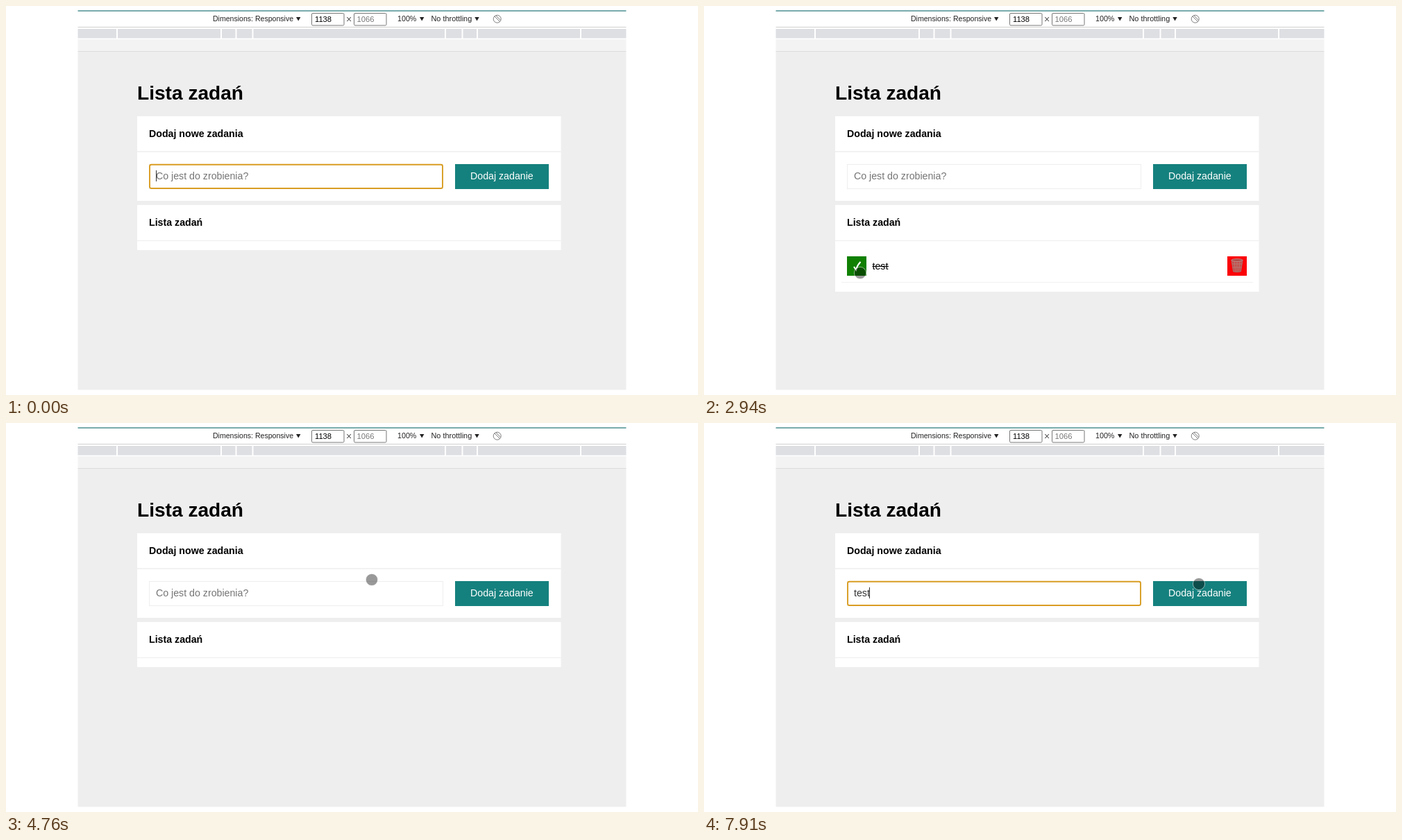
Recreate the animation shown at these times as an HTML page. Size 997x561 px, loop 8000 ms.

```html
<!DOCTYPE html>
<html lang="pl">
<head>
<meta charset="utf-8">
<title>Lista zadań</title>
<style>
  html, body { margin: 0; width: 100%; height: 100%; overflow: hidden; background: #fff; }
  svg { display: block; width: 997px; height: 561px; font: 14.2px "Liberation Sans", Arial, sans-serif; }
  .bold { font-weight: bold; }
  .tools { font-size: 10.7px; fill: #222; }
</style>
</head>
<body>
<svg viewBox="0 0 997 561">
  <!-- browser toolbar and ruler -->
  <path d="M103.5 7H893.5" stroke="#4a918f" stroke-width="1.4"/>
  <path d="M103.5 30.5H893.5" stroke="#cfcfcf"/>
  <g class="tools">
    <text x="298" y="22" font-size="10.55">Dimensions: Responsive</text>
    <text x="564" y="22">100%</text>
    <text x="612.5" y="22" font-size="10.9">No throttling</text>
    <text x="490" y="24" font-size="14" fill="#555">×</text>
    <path d="M418 16h6.4l-3.2 5.4zM596 16h6.4l-3.2 5.4zM675.300 16h6.400l-3.200 5.400z"/>
    <g fill="#fff" stroke="#767676">
      <rect x="440.500" y="10.500" width="46.500" height="17.500" rx="1.500"/>
      <rect x="501.500" y="10.500" width="46.500" height="17.500" rx="1.500"/>
    </g>
    <text x="445" y="23" font-size="11.2" fill="#000">1138</text>
    <text x="505.500" y="23" font-size="11.2" fill="#777">1066</text>
    <g fill="none" stroke="#7b7b7b">
      <circle cx="707.700" cy="18.700" r="5.500"/>
      <path d="M703.800 14.800l7.800 7.800M705.800 13.800l6.600 6.600"/>
    </g>
  </g>
  <rect x="103.500" y="33" width="790" height="13.500" fill="#dedfe3"/>
  <path d="M160 32v15M310 32v15M331.500 32v15M355.500 32v15M633 32v15M657.500 32v15M679 32v15M828 32v15" stroke="#fff" stroke-width="2"/>
  <rect x="103.500" y="48" width="790" height="17" fill="#f3f3f3"/>
  <rect x="103.500" y="65" width="790" height="488.500" fill="#eee"/>
  <path d="M103.500 65.500H893.500" stroke="#dcdcdc"/>

  <!-- form -->
  <text class="bold" x="189" y="135" font-size="28.1">Lista zadań</text>
  <rect x="189" y="159" width="610.500" height="122" fill="#fff"/>
  <path d="M189 210H799.500" stroke="#eee" stroke-width="1.300"/>
  <text class="bold" x="206" y="189">Dodaj nowe zadania</text>
  <rect x="206.500" y="228.500" width="423" height="35" fill="#fff" stroke="#eee"/>
  <rect id="ring" x="207" y="228.700" width="422" height="34.300" rx="2.500" fill="#fff" stroke="#d99d22" stroke-width="1.900"/>
  <text id="field" x="216" y="250"></text>
  <path id="caret" d="M0 237v16" stroke="#333"/>
  <rect x="647" y="228" width="135" height="36" fill="#15817e"/>
  <text x="669" y="250" fill="#fff">Dodaj zadanie</text>

  <!-- task list -->
  <rect id="panel" x="189" y="287" width="610.500" height="65" fill="#fff"/>
  <path d="M189 338.500H799.500" stroke="#eee"/>
  <text class="bold" x="206" y="317">Lista zadań</text>
  <g id="task">
    <path d="M198 398.500H791" stroke="#f1f1f1"/>
    <rect x="206" y="361" width="28" height="28" fill="#108002"/>
    <text x="242.500" y="380">test</text>
    <g id="done" fill="none">
      <path d="M216 376l3 4.500q2-7 6.500-11.500" stroke="#fff" stroke-width="2.100"/>
      <path d="M242.500 375.500h23.500" stroke="#000" stroke-width="1.200"/>
    </g>
    <rect x="754" y="361" width="28" height="28" fill="#fb0207"/>
    <path d="M760 366.500h16l-2.600 16.500q-5.400 1.500-10.800 0z" fill="#c4504c" stroke="#a8736e"/>
    <path d="M764 368l1.500 14M768 368v15M772 368l-1.500 14M761 372h14M762 377h12" stroke="#b08580" stroke-width=".7"/>
    <ellipse cx="768" cy="366.500" rx="8" ry="1.700" fill="#a5433f" stroke="#c3a5a0" stroke-width=".8"/>
  </g>
  <circle id="pointer" r="8.600" fill="#000" fill-opacity=".4" stroke="#fff" stroke-opacity=".5"/>
</svg>
<script>
const LOOP = 8000, STEP = 70;
const el = id => document.getElementById(id);
const show = (id, on) => el(id).style.display = on ? '' : 'none';
const within = (t, from, to) => t >= from && t < to;

// Typed value, from the given moment on
const typing = [
  [0, ''], [70, 'te'], [280, 'tes'], [420, 'test'], [770, ''],
  [6230, 't'], [6300, 'te'], [6510, 'tes'], [6580, 'test']
];
// Moments that restart the caret blink
const blinkStarts = [...typing.map(([time]) => time), 5320].sort((a, b) => a - b);

// Pointer strokes: [time, x, y]; the pointer is hidden while typing
const strokes = [
  { until: 6230, points: [
    [1540, 532, 248], [1820, 300, 345], [2030, 139, 373], [2240, 215, 379],
    [2450, 222, 387], [2870, 225, 385], [3220, 225, 385], [3710, 765, 376],
    [3920, 838, 374], [4130, 799, 375], [4270, 768, 376], [4410, 766, 379],
    [4550, 734, 401], [4760, 527, 226], [5040, 532, 248]
  ] },
  { until: LOOP, points: [
    [7350, 532, 248], [7630, 778, 294], [7840, 715, 231], [7910, 713, 232]
  ] }
];

function pointerAt(t) {
  const stroke = strokes.find(s => within(t, s.points[0][0], s.until));
  if (!stroke) return null;
  const { points } = stroke;
  const next = points.findIndex(p => p[0] > t);
  if (next < 0) return points.at(-1).slice(1);
  const [t0, x0, y0] = points[next - 1], [t1, x1, y1] = points[next];
  const u = (t - t0) / (t1 - t0), k = u * u * (3 - 2 * u);
  return [x0 + (x1 - x0) * k, y0 + (y1 - y0) * k];
}

function render(t) {
  const value = typing.findLast(([time]) => time <= t)[1];
  const field = el('field');
  field.textContent = value || 'Co jest do zrobienia?';
  field.setAttribute('fill', value ? '#333' : '#757575');

  const focused = !within(t, 2380, 5320);
  show('ring', focused);
  el('ring').style.opacity = t < 5320 ? 1 : Math.min(1, (t - 5250) / 210);
  const blinkAge = t - blinkStarts.findLast(time => time <= t);
  show('caret', focused && blinkAge % 1000 < 500);
  const caretX = value ? 216 + field.getComputedTextLength() : 216.5;
  el('caret').setAttribute('transform', `translate(${Math.floor(caretX) + .5})`);

  const hasTask = within(t, 770, 4410);
  show('task', hasTask);
  show('done', within(t, 2380, 3080));
  el('panel').setAttribute('height', hasTask ? 125 : 65);

  const pointer = pointerAt(t);
  show('pointer', pointer);
  if (pointer) el('pointer').setAttribute('transform', `translate(${pointer})`);
}

const start = performance.now();
function tick() {
  const t = (performance.now() - start) % LOOP;
  render(Math.min(7910, Math.floor(t / STEP) * STEP));
  requestAnimationFrame(tick);
}
tick();
</script>
</body>
</html>
```
